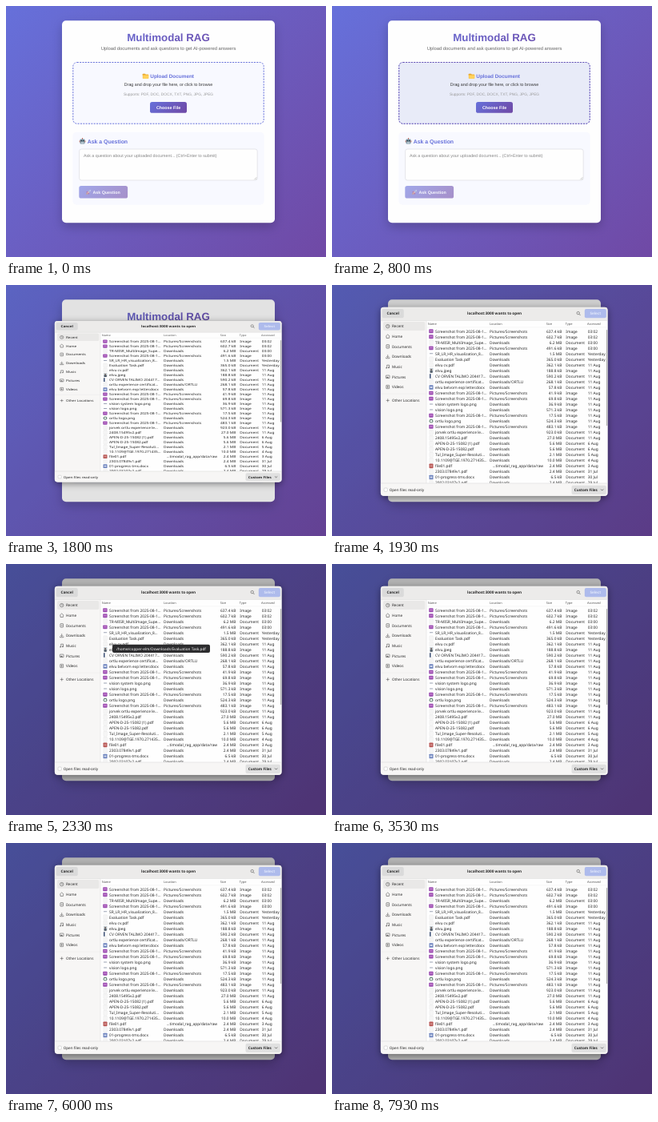
These frames come from a looping animation (400 by 314 pixels, 8000 ms). An HTML page with a canvas:

```html
<!DOCTYPE html>
<html lang="en">
<head>
<meta charset="utf-8">
<title>Upload and ask</title>
<style>
html, body { margin: 0; width: 100%; height: 100%; overflow: hidden; }
canvas { display: block; width: 400px; height: 314px; }
</style>
</head>
<body>
<canvas id="stage"></canvas>
<script>
const W = 400, H = 314, LOOP = 8000;
const canvas = document.getElementById('stage');
const ctx = canvas.getContext('2d');
const dpr = window.devicePixelRatio || 1;
canvas.width = W * dpr;
canvas.height = H * dpr;

const SANS = '"Liberation Sans", Arial, sans-serif';
const UI = '"Noto Sans", "Open Sans", sans-serif';
const BLUE = '#6670da', PURPLE = '#7049a5';
const DIALOG = { x: 60.8, y: 27.7, w: 283.8, h: 236 };

const SHOT = 'Screenshot from 2025-08-1…';
// icon | name | location | size | type | accessed
const FILES = `
s|${SHOT}|P|637.4 kB|Image|03:02
s|${SHOT}|P|602.7 kB|Image|03:02
d|TR-MISR_MultiImage_Supe…|D|6.2 MB|Document|03:00
s|${SHOT}|P|491.6 kB|Image|03:00
v|SR_LR_HR_visualization_8…|D|1.5 MB|Document|Yesterday
d|Evaluation Task.pdf|D|365.0 kB|Document|Yesterday
d|elvu cv.pdf|D|362.1 kB|Document|11 Aug
j|elvu.jpeg|D|188.8 kB|Image|11 Aug
c|CV ORVEN TALIMO 204417…|D|590.2 kB|Document|11 Aug
d|ortlu experience certificat…|Downloads/ORTLU|268.1 kB|Document|11 Aug
w|elvu belvorn exp letter.docx|D|57.8 kB|Document|11 Aug
s|${SHOT}|P|41.9 kB|Image|11 Aug
s|${SHOT}|P|69.8 kB|Image|11 Aug
v|vision system logo.png|D|36.9 kB|Image|11 Aug
v|vision logo.png|D|571.3 kB|Image|11 Aug
s|${SHOT}|P|17.5 kB|Image|11 Aug
o|ortlu logo.png|D|524.3 kB|Image|11 Aug
s|${SHOT}|P|483.1 kB|Image|11 Aug
d|jorvek ortlu experience le…|D|923.0 kB|Document|11 Aug
d|2408.15495v2.pdf|D|27.0 MB|Document|11 Aug
d|APEN-D-25-15082 (1).pdf|D|5.6 MB|Document|6 Aug
d|APEN-D-25-15082.pdf|D|5.6 MB|Document|6 Aug
d|Tul_Image_Super-Resoluti…|D|2.1 MB|Document|5 Aug
d|10.1109@TGE.1970.271435…|D|10.0 MB|Document|4 Aug
r|file01.pdf|…timodal_rag_app/data/raw|2.4 MB|Document|3 Aug
d|2303.07849v1.pdf|D|2.4 MB|Document|31 Jul
w|01-progress-tms.docx|D|6.5 kB|Document|30 Jul
d|2002.03107v2.pdf|D|2.4 MB|Document|29 Jul`.trim().split('\n').map(row => row.split('|'));
const PLACES = { P: 'Pictures/Screenshots', D: 'Downloads' };
const SIDEBAR = ['Recent', 'Home', 'Documents', 'Downloads', 'Music', 'Pictures', 'Videos'];

const progress = (t, start, length) => Math.min(1, Math.max(0, (t - start) / length));
const easeOut = p => 1 - (1 - p) ** 3;
const smooth = p => p * p * (3 - 2 * p);

function text(str, x, y, size, color, { font = UI, weight = 400, align = 'left' } = {}) {
  ctx.font = `${weight} ${size}px ${font}`;
  ctx.textAlign = align;
  ctx.fillStyle = color;
  ctx.fillText(str, x, y);
}

function box(x, y, w, h, r, fill, stroke, line = 0.6) {
  ctx.beginPath();
  ctx.roundRect(x, y, w, h, r);
  if (fill) { ctx.fillStyle = fill; ctx.fill(); }
  if (stroke) { ctx.strokeStyle = stroke; ctx.lineWidth = line; ctx.stroke(); }
}

function disc(x, y, r, fill) {
  ctx.beginPath();
  ctx.arc(x, y, r, 0, 7);
  ctx.fillStyle = fill;
  ctx.fill();
}

function path(points, color, width = 0.6, fill) {
  ctx.beginPath();
  points.forEach(([x, y]) => ctx.lineTo(x, y));
  if (fill) { ctx.fillStyle = fill; ctx.fill(); }
  if (color) { ctx.strokeStyle = color; ctx.lineWidth = width; ctx.stroke(); }
}

function withShadow(color, blur, dy, draw) {
  ctx.save();
  ctx.shadowColor = color;
  ctx.shadowBlur = blur * dpr;
  ctx.shadowOffsetY = dy * dpr;
  draw();
  ctx.restore();
}

// Same geometry as a CSS 135deg linear gradient on the box
function diagonal(x, y, w, h) {
  const cx = x + w / 2, cy = y + h / 2, d = (w + h) / 4;
  const g = ctx.createLinearGradient(cx - d, cy - d, cx + d, cy + d);
  g.addColorStop(0, BLUE);
  g.addColorStop(1, PURPLE);
  return g;
}

function folder(x, y) {
  box(x, y, 3.5, 2, 0.5, '#d99a24');
  box(x, y + 0.9, 7.4, 5.2, 0.6, '#f5b83d');
  box(x + 0.5, y + 2, 6.9, 4.1, 0.5, '#ffd25c');
}

function robot(x, y) {
  path([[x + 3.8, y], [x + 3.8, y + 2]], '#c0392b', 0.8);
  box(x, y + 3.2, 7.6, 2.2, 0.6, '#c65b4a');
  box(x + 0.8, y + 1.5, 6, 6, 1, '#7f99a8');
  disc(x + 2.6, y + 3.6, 0.8, '#26333b');
  disc(x + 5, y + 3.6, 0.8, '#26333b');
  box(x + 2, y + 5.5, 3.6, 1, 0.2, '#e3e9ec');
}

function rocket(x, y) {
  path([[x, y + 3], [x + 2.4, y + 2], [x + 4, y + 3.6], [x + 3, y + 6]], null, 0, '#cf4452');
  path([[x + 6, y], [x + 3, y + 1.2], [x + 1, y + 4], [x + 2, y + 5], [x + 4.8, y + 3]], null, 0, '#e6edf2');
  disc(x + 3.8, y + 2.2, 0.7, '#5382b0');
  disc(x + 0.8, y + 5.2, 0.8, '#f4a83c');
}

function drawPage(t) {
  ctx.fillStyle = diagonal(0, 0, W, H);
  ctx.fillRect(0, 0, W, H);
  withShadow('rgba(0,0,0,.2)', 13, 5, () => box(70, 18.3, 266, 253, 5, '#fefefe'));

  const sans = { font: SANS }, bold = { font: SANS, weight: 700 };
  const mid = { font: SANS, align: 'center' }, midBold = { ...mid, weight: 700 };
  text('Multimodal RAG', 203, 43.6, 13.33, diagonal(83.3, 31, 239.4, 16), midBold);
  text('Upload documents and ask questions to get AI-powered answers', 203, 55.2, 5.87, '#666', mid);

  const hover = smooth(progress(t, 500, 300));
  ctx.setLineDash([2, 1.35]);
  box(83.8, 70.5, 238.4, 76.7, 5, '#f8f9ff', BLUE, 1);
  ctx.globalAlpha = hover;
  box(83.8, 70.5, 238.4, 76.7, 5, '#e8ebf8', '#6651b4', 1);
  ctx.globalAlpha = 1;
  ctx.setLineDash([]);
  folder(170.8, 84.7);
  text('Upload Document', 180.3, 90, 6.4, BLUE, bold);
  text('Drag and drop your file here, or click to browse', 203, 99.5, 5.33, '#333', mid);
  text('Supports: PDF, DOC, DOCX, TXT, PNG, JPG, JPEG', 203, 111.8, 4.8, '#999', mid);

  const lift = 0.67 * smooth(progress(t, 1070, 200));
  withShadow(`rgba(102,126,234,${0.6 * lift})`, 5, 1.6, () =>
    box(180, 120 - lift, 46, 13.8, 2.67, diagonal(180, 120, 46, 13.8)));
  text('Choose File', 203, 128.8 - lift, 5.33, '#fff', midBold);

  box(83.3, 157.7, 239.4, 91, 5, '#f8f9ff');
  robot(91.7, 165);
  text('Ask a Question', 101.7, 171.8, 6.93, BLUE, bold);
  box(91.6, 179, 222.6, 39, 2.67, '#fefefe', '#dadce2', 0.67);
  text('Ask a question about your uploaded document... (Ctrl+Enter to submit)', 97, 189.2, 5.33, '#858585', sans);
  path([[310.3, 217.2], [313.4, 214.1]], '#888', 0.4);
  path([[312, 217.2], [313.4, 215.8]], '#888', 0.4);

  ctx.globalAlpha = 0.6;
  box(91.3, 225, 60.8, 15.6, 2.67, diagonal(91.3, 225, 60.8, 15.6));
  rocket(100.3, 229.7);
  ctx.globalAlpha = 1;
  text('Ask Question', 108.4, 234.7, 5.33, '#f7f7fd', bold);
}

function fileIcon(kind, x, y) {
  if (kind === 's') {
    box(x + 0.2, y + 0.4, 5.4, 4.9, 0.8, '#9a4db0');
    box(x + 1.2, y + 1.7, 3.4, 1.8, 0.3, '#c07acb');
  } else if (kind === 'w') {
    box(x + 0.5, y, 5, 5.6, 0.6, '#6d83bd');
    box(x + 1.7, y + 1.8, 2.6, 2, 0.2, '#d5dcee');
  } else if (kind === 'r') {
    box(x + 0.5, y, 5, 5.6, 0.7, '#b95a58');
    box(x + 1.7, y + 1.8, 2.6, 1.8, 0.4, '#d79a97');
  } else if (kind === 'j') {
    box(x + 1, y, 4.4, 5.6, 0.3, '#c3ccd2');
    disc(x + 3.2, y + 2, 1, '#6b5a52');
    box(x + 1.7, y + 3.1, 3, 2.5, 0.6, '#495461');
  } else if (kind === 'c') {
    box(x + 1, y, 4.2, 5.6, 0.2, '#fff', '#ccc', 0.3);
    box(x + 1, y, 1.6, 5.6, 0.2, '#44587c');
  } else if (kind === 'v') {
    box(x + 1, y + 2.2, 4.2, 1.1, 0.3, '#9aa2b4');
  } else if (kind === 'o') {
    disc(x + 3, y + 2.8, 2.4, '#5e8270');
    disc(x + 3, y + 2.8, 1.3, '#fff');
  } else {
    box(x + 1, y, 4.2, 5.6, 0.2, '#fff', '#d0d0d0', 0.35);
    for (let i = 1; i < 5; i++) path([[x + 1.8, y + i * 1.1], [x + 4.4, y + i * 1.1]], '#ccc', 0.25);
  }
}

function sideIcon(i, x, y) {
  const c = '#555';
  const outline = (dx, dy, w, h, r) => box(x + dx, y + dy, w, h, r, null, c, 0.6);
  if (i === 0) {
    outline(-2.2, -2.2, 4.4, 4.4, 2.2);
    path([[x, y - 1.3], [x, y], [x + 1.1, y]], c, 0.5);
  } else if (i === 1) {
    path([[x - 2.5, y], [x, y - 2.3], [x + 2.5, y]], c);
    path([[x - 1.7, y], [x - 1.7, y + 2.2], [x + 1.7, y + 2.2], [x + 1.7, y]], c);
  } else if (i === 2) {
    outline(-1.8, -2.2, 3.6, 4.4, 0.4);
    path([[x - 0.9, y - 0.5], [x + 0.9, y - 0.5]], c, 0.4);
    path([[x - 0.9, y + 0.7], [x + 0.9, y + 0.7]], c, 0.4);
  } else if (i === 3) {
    path([[x, y - 2.3], [x, y + 1]], c);
    path([[x - 1.5, y - 0.4], [x, y + 1.1], [x + 1.5, y - 0.4]], c);
    path([[x - 2.2, y + 1], [x - 2.2, y + 2.2], [x + 2.2, y + 2.2], [x + 2.2, y + 1]], c);
  } else if (i === 4) {
    path([[x - 1, y + 1.4], [x - 1, y - 2], [x + 1.8, y - 2], [x + 1.8, y + 1]], c);
    disc(x - 1.6, y + 1.5, 0.8, c);
    disc(x + 1.2, y + 1.2, 0.8, c);
  } else if (i === 5) {
    outline(-2.3, -1.8, 4.6, 3.6, 0.4);
    path([[x - 1.8, y + 1.3], [x - 0.5, y - 0.3], [x + 1.6, y + 1.3]], null, 0, c);
  } else {
    outline(-1.9, -2.1, 3.8, 4.2, 0.3);
    path([[x - 0.8, y - 1.2], [x + 1.1, y], [x - 0.8, y + 1.2]], null, 0, c);
  }
}

function drawDialog() {
  const { x, y, w, h } = DIALOG;
  const right = x + w, ink = '#262626', panel = '#f7f6f5';
  withShadow('rgba(0,0,0,.45)', 8, 2, () => box(x, y, w, h, 4, panel));
  ctx.save();
  box(x, y, w, h, 4);
  ctx.clip();

  ctx.fillStyle = '#ecebea';
  ctx.fillRect(x, y, w, 44.5 - y);
  ctx.fillStyle = '#fefefe';
  ctx.fillRect(118, 44.5, right - 118, 203.5);
  path([[x, 44.5], [right, 44.5]], '#d8d8d8', 0.5);
  path([[118, 44.5], [118, 248]], '#d9d9d9', 0.5);

  const boldMid = { weight: 700, align: 'center' };
  box(62.7, 30, 27, 11.3, 2, '#dadada');
  text('Cancel', 76.2, 37.3, 4.6, ink, boldMid);
  text('localhost:3000 wants to open', 203, 37.2, 4.7, ink, boldMid);
  box(306, 33.4, 3.4, 3.4, 1.7, null, '#555', 0.6);
  path([[309, 36.4], [310.5, 38]], '#555', 0.7);
  box(315.8, 30, 27, 11.3, 2, '#aebbec');
  text('Select', 329.3, 37.3, 4.6, '#e2e8fb', boldMid);

  box(64, 46, 52.3, 11, 1.8, '#e9e8e7');
  SIDEBAR.forEach((name, i) => {
    const cy = 51.6 + i * 12.65;
    sideIcon(i, 69.7, cy);
    text(name, 75, cy + 1.7, 4.6, ink);
  });
  path([[x, 136], [118, 136]], '#e4e4e4', 0.4);
  path([[67.7, 144.4], [71.7, 144.4]], '#555');
  path([[69.7, 142.4], [69.7, 146.4]], '#555');
  text('Other Locations', 75, 146.1, 4.6, ink);

  [['Name', 119.7], ['Location', 197], ['Size', 267.7], ['Type', 291.7], ['Accessed', 319]]
    .forEach(([label, left]) => text(label, left, 50, 3.9, '#555'));
  path([[118, 52.7], [right, 52.7]], '#ececec', 0.4);

  ctx.save();
  ctx.beginPath();
  ctx.rect(118, 53, right - 118, 195);
  ctx.clip();
  FILES.forEach(([icon, name, place, size, type, date], i) => {
    const cy = 57.7 + i * 7.03, base = cy + 1.8;
    fileIcon(icon, 121, cy - 2.8);
    text(name, 129, base, 4.8, ink);
    text(PLACES[place] || place, place[0] === '…' ? 200.7 : 197, base, 4.8, ink);
    text(size, 287.3, base, 4.8, ink, { align: 'right' });
    text(type, 292.3, base, 4.8, ink);
    text(date, 319.8, base, 4.8, ink);
  });
  ctx.restore();
  box(343, 56, 1.3, 120, 0.6, '#a9a9a9');

  ctx.fillStyle = panel;
  ctx.fillRect(x, 248, w, 18);
  path([[x, 248], [right, 248]], '#d6d6d6', 0.5);
  box(65, 254, 4.3, 4.3, 1, '#fff', '#bbb', 0.5);
  text('Open files read-only', 71.7, 257.9, 4.6, ink);
  box(299.5, 250.7, 43.3, 11.2, 2, '#e0e0e0');
  text('Custom Files', 302.7, 257.9, 4.6, ink, { weight: 700 });
  path([[336, 255.5], [337.6, 257.1], [339.2, 255.5]], '#444', 0.7);
  ctx.restore();
}

function drawTooltip() {
  box(133, 100.8, 122, 10.3, 2, '#2c2c2e');
  text('/home/copper-elm/Downloads/Evaluation Task.pdf', 194, 107.6, 4.7, '#fff', { align: 'center' });
}

function render(t) {
  ctx.setTransform(dpr, 0, 0, dpr, 0, 0);
  ctx.textRendering = 'geometricPrecision';
  drawPage(t);

  ctx.fillStyle = `rgba(0,0,0,${0.3 * progress(t, 1620, 500)})`;
  ctx.fillRect(0, 0, W, H);

  const open = easeOut(progress(t, 1730, 150));
  if (open > 0) {
    const middle = DIALOG.y + DIALOG.h / 2;
    ctx.save();
    ctx.translate(0, middle);
    ctx.scale(1, open);
    ctx.translate(0, -middle);
    drawDialog();
    ctx.restore();
  }
  if (t >= 2300 && t < 2730) drawTooltip();
}

const start = performance.now();
function tick() {
  render((performance.now() - start) % LOOP);
  requestAnimationFrame(tick);
}
tick();
</script>
</body>
</html>
```
